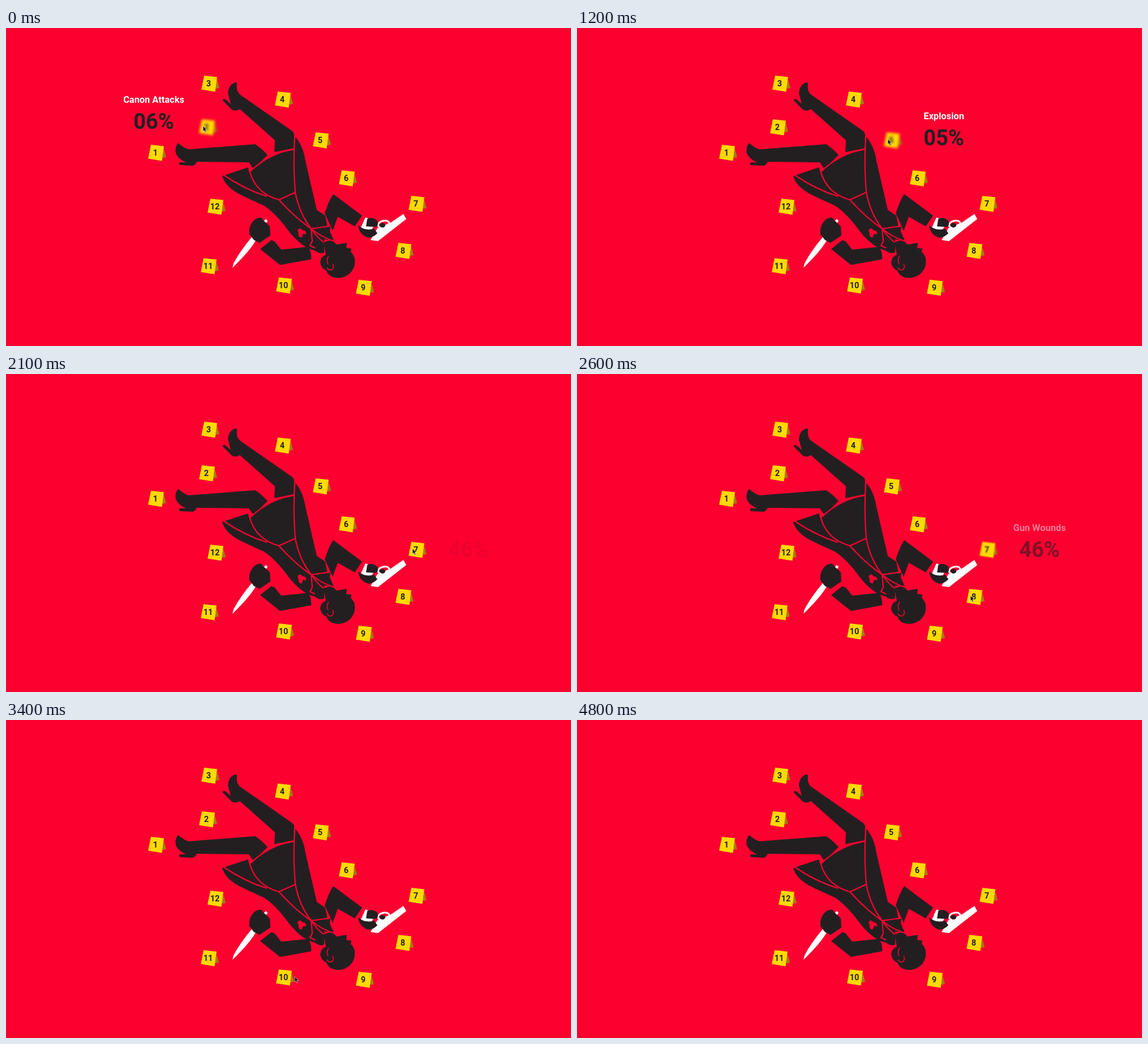
Write an HTML page that moves like this. It is 998 by 561 pixels and loops after 4.9 s.

```html
<!DOCTYPE html>
<html lang="en">
<head>
<meta charset="utf-8">
<title>Evidence markers</title>
<style>
  html, body { margin: 0; width: 100%; height: 100%; overflow: hidden; background: #fc0030; }
  svg { display: block; width: 100vw; height: 100vh; }
  text { font-family: Roboto, "Liberation Sans", sans-serif; font-weight: 700; text-anchor: middle; }
  .tag { font-size: 14.5px; fill: #231f20; }
  .title { font-size: 16.4px; fill: #fff; }
  .share { font-size: 38px; fill: #231f20; }
  .body { fill: #231f20; }
  .seam { fill: none; stroke: #fc0030; stroke-width: 2.2; }
  .weapon { fill: #fff; }
</style>
</head>
<body>
<svg viewBox="0 0 998 561">
  <rect width="998" height="561" fill="#fc0030"/>

  <g class="body">
    <!-- legs -->
    <path d="M405 96Q393 100 392 115L397 134L388 126Q383 124 383 128L399 144Q406 148 413 143L475 198L474 219L509 212V188Q508 183 503 180L414 118Q406 112 408 99Q408 96 405 96Z"/>
    <path d="M304 203Q298 209 300 221Q304 231 318 237H307Q304 240 308 242L330 243Q335 241 337 236L429 237L437 249L462 224Q450 211 440 205L323 214Q316 213 304 203Z"/>
    <!-- torso -->
    <path d="M382 261L427 246L433 253Q466 220 509 215L511 192Q525 208 529 235L549 321L564 331L568 352L573 350L572 359L579 375L562 373V396Q555 400 546 393Q523 388 500 359Q476 326 455 313Q430 302 410 292Q386 278 382 261Z"/>
    <!-- head -->
    <path d="M561 379Q570 373 578 376L584 382L602 379L601 388L610 389L609 395Q618 403 616 417C613 432 600 441 586 441Q570 440 566 428Q556 424 555 413Q556 403 565 400Z"/>
  </g>
  <g class="seam">
    <path d="M429 247Q438 291 482 303L511 290"/>
    <path d="M430 254Q466 220 509 214"/>
    <path d="M510 190Q507 245 511 290Q518 327 539 354L568 350"/>
    <path d="M384 259Q420 284 461 297M482 303Q512 336 539 354"/>
    <path d="M579 376Q557 369 539 354Q549 369 561 378M539 354L541 376L537 384L546 388"/>
    <path d="M570 402Q565 409 569 417M567 423Q571 429 576 426Q580 422 577 416" stroke-width="1.5"/>
  </g>
  <path d="M515 357Q519 350 524 357Q531 357 530 364L525 363L522 370Q515 368 517 363Z" fill="#fc0030"/>

  <!-- gun arm -->
  <path class="body" d="M578 293L629 331L616 350L586 333L577 358Q572 346 563 327Q570 305 578 293Z"/>
  <g class="weapon">
    <path d="M702 328L707 337L657 376L644 374L656 353L680 343Z"/>
    <path d="M635 334L654 342L644 359L626 354Z"/>
    <ellipse cx="667" cy="346" rx="10" ry="6" transform="rotate(-15 667 346)" fill="none" stroke="#fff" stroke-width="3"/>
  </g>
  <g class="body">
    <path d="M622 348Q634 359 650 354L656 362Q650 369 640 370Q624 365 622 348Z"/>
    <path d="M638 337Q646 332 656 340Q659 349 653 351L636 350Z"/>
    <ellipse cx="665" cy="348" rx="5" ry="4"/>
  </g>

  <!-- knife arm -->
  <path class="weapon" d="M455 341L459 337L462 340L441 375Q430 394 400 423L402 415Q413 394 434 369Z"/>
  <g class="body">
    <path d="M432 348Q437 337 446 335Q452 333 454 339L460 344L466 350L467 366L448 379L438 374L430 364Q429 354 432 348Z"/>
    <path d="M449 390L469 374L475 377L486 391L534 386Q540 396 539 408L484 418Z"/>
  </g>

  <g id="scene"></g>
  <path id="cursor" d="M0 0V9.4L2.1 7.5L3.8 11.2L5.5 10.4L3.9 6.8H6.8Z" fill="#111" stroke="#fff" stroke-width=".7" stroke-opacity=".8"/>
</svg>
<script>
const LOOP = 4900, STEP = 100, FADE = 400, TITLE_DELAY = 80, REACH = 93;
const scene = document.getElementById('scene');
const cursor = document.getElementById('cursor');

// x, y: number centre. on, off: hover times.
// side, drop: label offset, in reaches to the right and in pixels down.
const markers = [
  { x: 264, y: 220 },
  { x: 354, y: 175, on: -600, off: 100, side: -1, drop: 3, title: 'Canon Attacks', share: '06%' },
  { x: 358, y: 98 },
  { x: 488, y: 126, on: 400, off: 530, side: 0.2, drop: -39, share: '17%' },
  { x: 555, y: 198, on: 750, off: 1350, side: 1, drop: 9, title: 'Explosion', share: '05%' },
  { x: 601, y: 265, on: 1770, off: 1830 },
  { x: 724, y: 310, on: 2040, off: 2420, side: 1, drop: 13, title: 'Gun Wounds', share: '46%' },
  { x: 701, y: 393, on: 2600, off: 2750 },
  { x: 631, y: 458, on: 2850, off: 3000, side: 0.9, drop: 39, title: 'Poison', share: '05%' },
  { x: 490, y: 454, on: 3490, off: 3550, side: -0.7, drop: 43, share: '03%' },
  { x: 357, y: 420, on: 3590, off: 3950, side: -1, drop: 25, title: 'Stab Wounds', share: '19%' },
  { x: 369, y: 315, on: 4120, off: 4300, side: -1, drop: 23, title: 'Electrocution', share: '03%' },
];
const hovered = markers.filter(m => m.off);
const exit = { x: 452, y: 495, on: 4700, off: 4800 };
const stops = [...hovered, exit];

function add(tag, attrs, parent = scene, text = '') {
  const el = document.createElementNS('http://www.w3.org/2000/svg', tag);
  for (const key in attrs) el.setAttribute(key, attrs[key]);
  el.textContent = text;
  return parent.appendChild(el);
}

markers.forEach((m, i) => {
  m.node = add('g', { transform: `translate(${m.x} ${m.y})` });
  add('path', { d: 'M15 -7L19 8L12 9Z', fill: '#a47e0b' }, m.node);
  add('path', { d: 'M-8 -14L15 -11.5L11.5 14.5L-13 10.5Z', fill: '#ffd900' }, m.node);
  add('text', { class: 'tag', y: 5 }, m.node, String(i + 1));
  if (m.share) {
    const x = m.x + REACH * m.side, y = m.y + m.drop;
    m.titleNode = add('text', { class: 'title', x, y: y - 46.5 }, scene, m.title);
    m.shareNode = add('text', { class: 'share', x, y }, scene, m.share);
  }
});

const clamp = x => Math.min(1, Math.max(0, x));
const smooth = x => clamp(x) ** 2 * (3 - 2 * clamp(x));

const level = (t, on, off) =>
  smooth((Math.min(t, off) - on) / FADE) * (1 - smooth((t - off) / FADE));

// The pointer rests on each stop, then runs straight to the next one.
function pointerAt(t) {
  const i = Math.max(0, stops.findLastIndex(s => s.off <= t));
  const from = stops[i], to = stops[i + 1] || exit;
  const k = clamp((t - from.off) / (to.on - from.off));
  return [from.x + (to.x - from.x) * k - 6, from.y + (to.y - from.y) * k - 2];
}

function draw(t) {
  for (const m of hovered) {
    const amount = level(t, m.on, m.off);
    m.node.style.filter = amount > 0.1 ? `blur(${2 * amount}px)` : 'none';
    if (m.share) {
      m.shareNode.setAttribute('opacity', amount);
      m.titleNode.setAttribute('opacity', level(t, m.on + TITLE_DELAY, m.off));
    }
  }
  cursor.setAttribute('transform', `translate(${pointerAt(t)})`);
  cursor.setAttribute('visibility', t < exit.off ? 'visible' : 'hidden');
}

const start = performance.now();
function tick() {
  const t = (performance.now() - start) % LOOP;
  draw(Math.floor(t / STEP) * STEP);
  requestAnimationFrame(tick);
}
tick();
</script>
</body>
</html>
```
